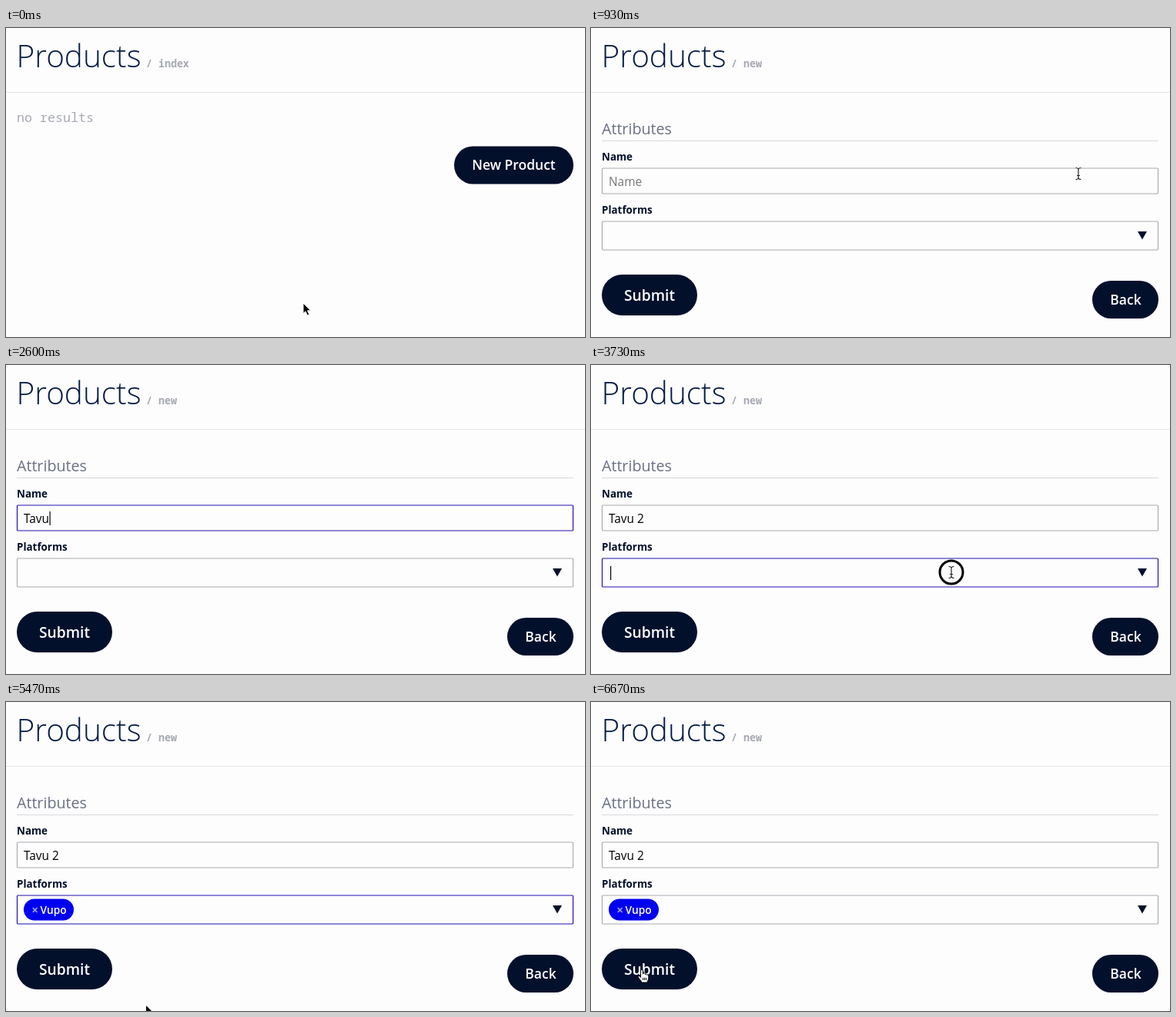
An HTML page that plays this animation: 752x401 px, repeating every 6740 ms.

```html
<!DOCTYPE html>
<html lang="en">
<head>
<meta charset="utf-8">
<title>Products</title>
<style>
  html, body { margin: 0; width: 100%; height: 100%; overflow: hidden; background: #fefdfe; }
  svg { display: block; width: 752px; height: 401px; font-family: "Open Sans", "Noto Sans", sans-serif; }
  text { white-space: pre; }
  .title { font-size: 40.5px; font-weight: 300; fill: #051c46; }
  .mono { font-family: "Noto Sans Mono", "DejaVu Sans Mono", monospace; fill: #a5a9b2; }
  .crumb { font-size: 13.3px; font-weight: 600; }
  .empty { font-size: 16.67px; font-weight: 500; }
  .section { font-size: 19.7px; fill: #6a7085; }
  .label { font-size: 13.4px; font-weight: 700; fill: #03102c; }
  .value { font-size: 15.4px; fill: #000; }
  .button rect { fill: #03102c; }
  .button text { font-size: 17.5px; font-weight: 600; fill: #fff; text-anchor: middle; }
  .button .large { font-size: 19.2px; }
  .field { fill: #fefdfe; stroke-width: 1.2; }
  .tag { font-size: 13.8px; font-weight: 600; fill: #fff; }
</style>
</head>
<body>
<svg viewBox="0 0 752 401">
  <rect width="752" height="401" fill="#fefdfe"/>
  <text class="title" x="13.5" y="51">Products</text>
  <text class="mono crumb" id="crumb" x="182" y="51"></text>
  <path d="M0 83.5H752" stroke="#e6e6ea"/>

  <g id="indexPage">
    <text class="mono empty" x="14" y="122">no results</text>
    <g class="button">
      <rect x="582" y="153.5" width="155" height="49" rx="24.5"/>
      <text x="659.5" y="184">New Product</text>
    </g>
  </g>

  <g id="newPage">
    <text class="section" x="14" y="137.5">Attributes</text>
    <path d="M14 146.5H737" stroke="#d6d8de"/>
    <text class="label" x="14" y="171.5">Name</text>
    <rect class="field" id="nameField" x="14.5" y="182" width="722" height="33" rx="1"/>
    <text class="value" id="nameText" x="23" y="204.5"></text>
    <text class="label" x="14" y="240.5">Platforms</text>
    <rect class="field" id="platformField" x="14.5" y="251" width="722" height="37" rx="1"/>
    <text class="value" id="platformText" x="25" y="275"></text>
    <path d="M710 264H722L716 274.5Z" fill="#03102c"/>
    <g id="tag" class="tag">
      <rect x="23" y="255.5" width="65" height="28" rx="14" fill="#0000f0"/>
      <path d="M34.8 267.2l5.6 5.6m0-5.6l-5.6 5.6" stroke="#9a9af8" stroke-width="1.7"/>
      <text x="44.5" y="275">Vupo</text>
    </g>
    <rect id="caret" width="1.2" height="18" fill="#000"/>
    <g class="button">
      <rect x="14" y="320" width="124" height="53" rx="26.5"/>
      <text class="large" x="76" y="354">Submit</text>
      <rect x="651" y="328" width="86" height="49" rx="24.5"/>
      <text x="694.5" y="359">Back</text>
    </g>
  </g>

  <g id="pointer">
    <circle id="ring" r="15" fill="#fefdfe" stroke="#000" stroke-width="3"/>
    <path id="arrow" d="M0 0V13.6L3.1 10.7 5.4 16 7.9 14.9 5.6 9.8H9.8Z" fill="#000" stroke="#fff" stroke-width="1"/>
    <g id="beam" fill="none">
      <path d="M-3.5-7.5Q0-7.5 0-5Q0-7.5 3.5-7.5M0-5V5M-3.5 7.5Q0 7.5 0 5Q0 7.5 3.5 7.5M-2 2.5H2" stroke="#fff" stroke-width="2.6"/>
      <path d="M-3.5-7.5Q0-7.5 0-5Q0-7.5 3.5-7.5M0-5V5M-3.5 7.5Q0 7.5 0 5Q0 7.5 3.5 7.5M-2 2.5H2" stroke="#222" stroke-width="1.2"/>
    </g>
    <path id="hand" d="M-1.4 9.5V1Q-1.4-.8 0-.8T1.5 1V5.2Q3-.1 4.3 5.4Q5.8 4 6.7 6.2Q8.8 5 8.8 8V11Q8.6 13 7.3 14.2V16H-.6V14.4Q-2.8 12.2-4.9 8.8Q-4.8 6.6-2.8 7.7Z M1.7 9.8V13 M3.7 9.8V13 M5.7 9.8V13" fill="#fff" stroke="#000" stroke-width="1"/>
  </g>
</svg>
<script>
const LOOP = 6740;
const PAGE_OPEN = 800, NAME_FOCUS = 1470, PLATFORM_FOCUS = 3670, TAG_ADDED = 4500, BLUR = 6330;
const BORDER = '#a9acb3', FOCUS = '#2112b0';

const nameKeys = { text: 'Tavu 2', times: [2130, 2270, 2400, 2530, 2730, 2870] };
const platformKeys = { text: 'Vupo', times: [4090, 4180, 4270, 4360] };
const clicks = [[650, 800], [1450, 1610], [3650, 3800], [6270, 6440]];
const hiddenSpans = [[2130, 3250], [4070, 5110]];

const linear = u => u;
const smooth = u => u * u * (3 - 2 * u);
const easeIn = u => u * u;
const easeOut = u => 1 - (1 - u) ** 2;

const moves = [
  { start: 50, end: 530, from: [386, 357], to: [633, 189], ease: [smooth, smooth] },
  { start: 3250, end: 3620, from: [633, 189], to: [468, 269], ease: [smooth, smooth] },
  { start: 5130, end: 5470, from: [468, 269], to: [182, 393], ease: [easeIn, easeOut] },
  { start: 5470, end: 5900, from: [182, 393], to: [66, 348], ease: [easeOut, linear] }
];

const el = {};
document.querySelectorAll('[id]').forEach(node => el[node.id] = node);

const show = (node, visible) => node.setAttribute('visibility', visible ? 'inherit' : 'hidden');
const within = (t, [start, end]) => t >= start && t < end;
const typed = (keys, t) => keys.text.slice(0, keys.times.filter(k => k <= t).length);

function pointerAt(t) {
  const move = moves.filter(m => t >= m.start).pop() || moves[0];
  const u = Math.min(1, Math.max(0, (t - move.start) / (move.end - move.start)));
  return move.from.map((a, i) => a + (move.to[i] - a) * move.ease[i](u));
}

function pointerShape(x, y, formOpen) {
  const inBox = (left, top, right, bottom) => x >= left && x <= right && y >= top && y <= bottom;
  if (!formOpen) return inBox(582, 153, 737, 203) ? 'hand' : 'arrow';
  if (inBox(14, 181, 737, 215) || inBox(14, 250, 737, 288)) return 'beam';
  return inBox(14, 320, 138, 373) || inBox(651, 328, 737, 377) ? 'hand' : 'arrow';
}

function drawPointer(t, formOpen) {
  const [x, y] = pointerAt(t);
  const shape = pointerShape(x, y, formOpen);
  el.pointer.setAttribute('transform', `translate(${x} ${y})`);
  show(el.pointer, !hiddenSpans.some(span => within(t, span)));
  show(el.ring, clicks.some(span => within(t, span)));
  for (const id of ['arrow', 'beam', 'hand']) show(el[id], id === shape);
}

function drawCaret(t, onName, onPlatform, tagged) {
  const edits = [NAME_FOCUS, ...nameKeys.times, PLATFORM_FOCUS, ...platformKeys.times, TAG_ADDED];
  const lastEdit = edits.filter(e => e <= t).pop();
  let x = 24;
  if (onName && t >= nameKeys.times[0]) x = 23.5 + el.nameText.getComputedTextLength();
  if (onPlatform) x = tagged ? 94 : 25 + el.platformText.getComputedTextLength();
  el.caret.setAttribute('x', x);
  el.caret.setAttribute('y', onName ? 190 : 261);
  show(el.caret, (onName || onPlatform) && (t - lastEdit) % 1000 < 500);
}

function draw(t) {
  const formOpen = t >= PAGE_OPEN;
  const onName = within(t, [NAME_FOCUS, PLATFORM_FOCUS]);
  const onPlatform = within(t, [PLATFORM_FOCUS, BLUR]);
  const tagged = t >= TAG_ADDED;
  const name = typed(nameKeys, t);

  el.crumb.textContent = formOpen ? '/ new' : '/ index';
  show(el.indexPage, !formOpen);
  show(el.newPage, formOpen);
  el.nameText.textContent = name || 'Name';
  el.nameText.style.fill = name ? '#000' : '#757575';
  el.platformText.textContent = tagged ? '' : typed(platformKeys, t);
  el.nameField.setAttribute('stroke', onName ? FOCUS : BORDER);
  el.platformField.setAttribute('stroke', onPlatform ? FOCUS : BORDER);
  show(el.tag, tagged);
  drawCaret(t, onName, onPlatform, tagged);
  drawPointer(t, formOpen);
}

const began = performance.now();
function tick() {
  draw((performance.now() - began) % LOOP);
  requestAnimationFrame(tick);
}
tick();
</script>
</body>
</html>
```
